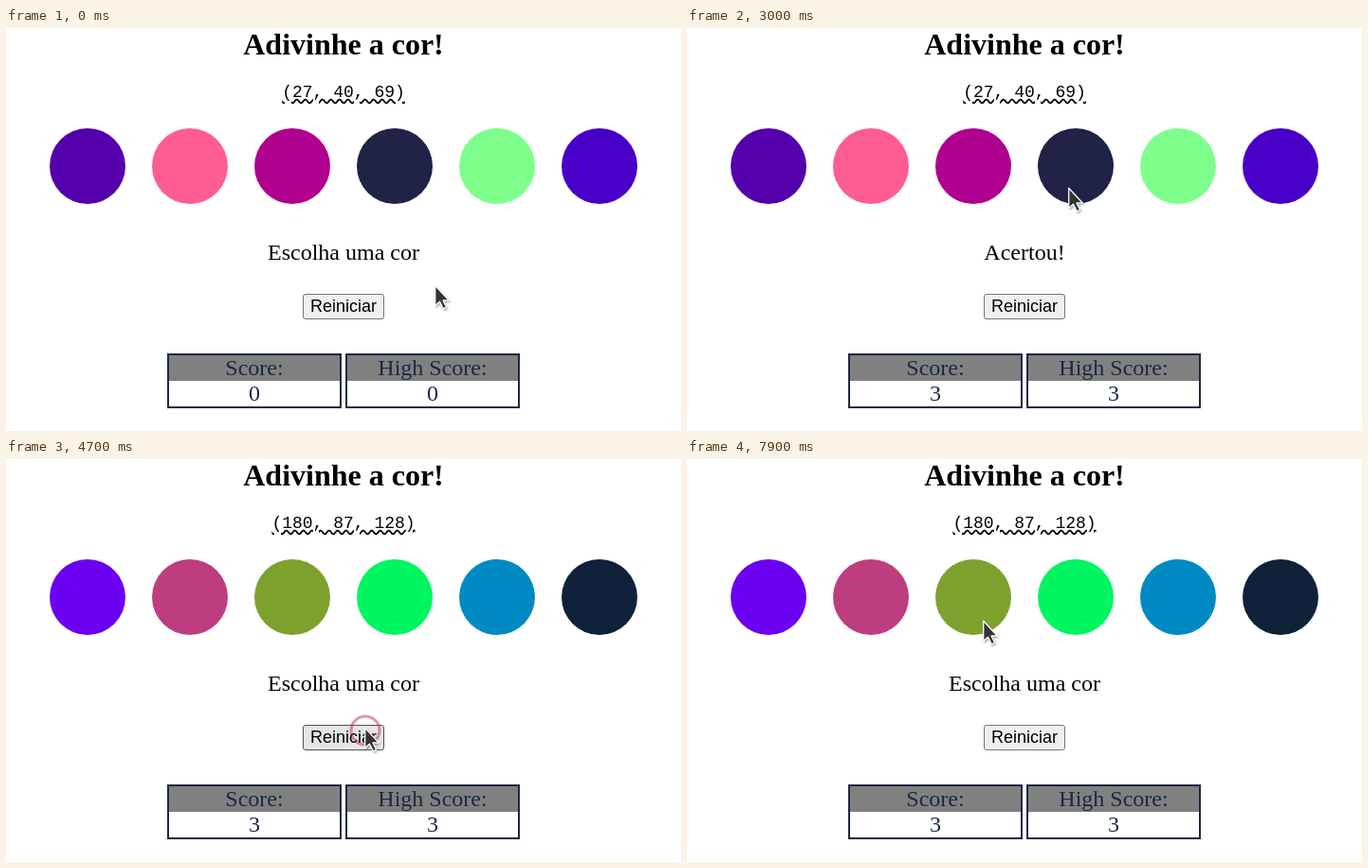
An HTML page that plays this animation: 712x426 px, repeating every 8000 ms.

```html
<!DOCTYPE html>
<html lang="pt">
<head>
<meta charset="utf-8">
<title>Adivinhe a cor!</title>
<style>
  html, body { margin: 0; width: 100%; height: 100%; overflow: hidden; background: #fff; }
  body { position: relative; color: #000; text-align: center; font: 24px/26px "Liberation Serif", "Times New Roman", serif; }
  .line { position: absolute; left: 0; width: 712px; }
  #title { top: -1px; font-size: 32px; line-height: 36px; font-weight: bold; }
  #rgb {
    top: 58px; font: 18px/20px "Liberation Mono", "Courier New", monospace;
    text-decoration: underline wavy;
  }
  .dot { position: absolute; top: 106px; width: 80px; height: 80px; border-radius: 50%; }
  #message { top: 224px; }
  #button {
    position: absolute; box-sizing: border-box; left: 313px; top: 281px; width: 86px; height: 27px;
    padding-top: 2px; border: 1px solid; border-radius: 3px;
    font: 18px/20px "Liberation Sans", Arial, sans-serif;
  }
  .score {
    position: absolute; box-sizing: border-box; top: 344px; width: 184px; height: 58px;
    border: 2px solid #1b2845; color: #1b2845;
  }
  .score div { height: 27px; }
  .score div:first-child { background: #808080; }
  svg { position: absolute; left: 0; top: 0; }
</style>
</head>
<body>
<div id="title" class="line">Adivinhe a cor!</div>
<div id="rgb" class="line"></div>
<div id="dots"></div>
<div id="message" class="line"></div>
<div id="button">Reiniciar</div>
<div class="score" style="left: 170px"><div>Score:</div><div class="points"></div></div>
<div class="score" style="left: 358px"><div>High Score:</div><div class="points"></div></div>
<svg width="712" height="426" viewBox="0 0 712 426">
  <defs>
    <filter id="soft" x="-50%" y="-50%" width="200%" height="200%">
      <feGaussianBlur stdDeviation="1"/>
    </filter>
    <path id="arrow" d="M0.7 1.2V22.6L5.5 18.3L9.3 25.9L12.6 24.3L9 17H15.4Z" stroke-linejoin="round"/>
  </defs>
  <circle id="ring" fill="none" stroke="#b81c3c" stroke-width="3" opacity=".45"/>
  <g id="cursor">
    <use href="#arrow" x="1" y="1.5" stroke="#000" opacity=".4" filter="url(#soft)"/>
    <use href="#arrow" fill="#333" stroke="#fff" stroke-width="1.3"/>
  </g>
</svg>
<script>
const LOOP = 8000, STEP = 100;
const HIT = 2000, RESTART = 4700, RELEASE = 300;
const $ = id => document.getElementById(id);

const rounds = [
  { rgb: "(27, 40, 69)", colors: ["#5400ad", "#ff5c92", "#b0008f", "#202246", "#7eff8c", "#4800c8"] },
  { rgb: "(180, 87, 128)", colors: ["#6c00f2", "#be3d7f", "#7da12d", "#00f660", "#008ac4", "#0f2239"] }
];

const home = { x: 452, y: 271 };
const moves = [
  { from: 500, to: 1600, x: 405, y: 152 },
  { from: 2700, to: 3900, x: 385, y: 265 },
  { from: 3900, to: 4200, x: 378, y: 283 },
  { from: 5200, to: 6300, x: 452, y: 286 },
  { from: 6700, to: 7900, x: 312, y: 170 }
];

$("dots").innerHTML = rounds[0].colors
  .map((c, i) => `<div class="dot" style="left: ${46 + 108 * i}px"></div>`).join("");

const dots = [...$("dots").children];
const points = document.querySelectorAll(".points");

function setText(el, value) {
  if (el.textContent !== value) el.textContent = value;
}

function cursorAt(t) {
  let { x, y } = home;
  for (const move of moves) {
    const part = (t - move.from) / (move.to - move.from);
    const k = Math.min(1, Math.max(0, part)) ** 1.4;
    x += (move.x - x) * k;
    y += (move.y - y) * k;
  }
  return [Math.round(x), Math.round(y)];
}

// A ring flashes on each press and again, larger, on its release.
function ringRadius(t) {
  if (t === HIT || t === RESTART) return 15;
  if (t === HIT + RELEASE || t === RESTART + RELEASE) return 16.5;
  return 0;
}

function draw(time) {
  const t = Math.floor((time % LOOP) / STEP) * STEP;
  const round = rounds[t < RESTART ? 0 : 1];
  const won = t > HIT;

  setText($("rgb"), round.rgb);
  dots.forEach((dot, i) => dot.style.background = round.colors[i]);
  setText($("message"), won && t < RESTART ? "Acertou!" : "Escolha uma cor");
  points.forEach(p => setText(p, won ? "3" : "0"));

  const [x, y] = cursorAt(t);
  $("cursor").setAttribute("transform", `translate(${x} ${y})`);

  const hover = x >= 313 && x < 399 && y >= 281 && y < 308;
  const pressed = t === RESTART - STEP;
  $("button").style.background = pressed ? "#f5f5f5" : hover ? "#e5e5e5" : "#efefef";
  $("button").style.borderColor = pressed ? "#8d8d8d" : hover ? "#4f4f4f" : "#767676";

  const ring = { cx: x + 1, cy: y + 4, r: ringRadius(t) };
  for (const name in ring) $("ring").setAttribute(name, ring[name]);
}

const start = performance.now();
function tick() {
  draw(performance.now() - start);
  requestAnimationFrame(tick);
}
tick();
</script>
</body>
</html>
```
